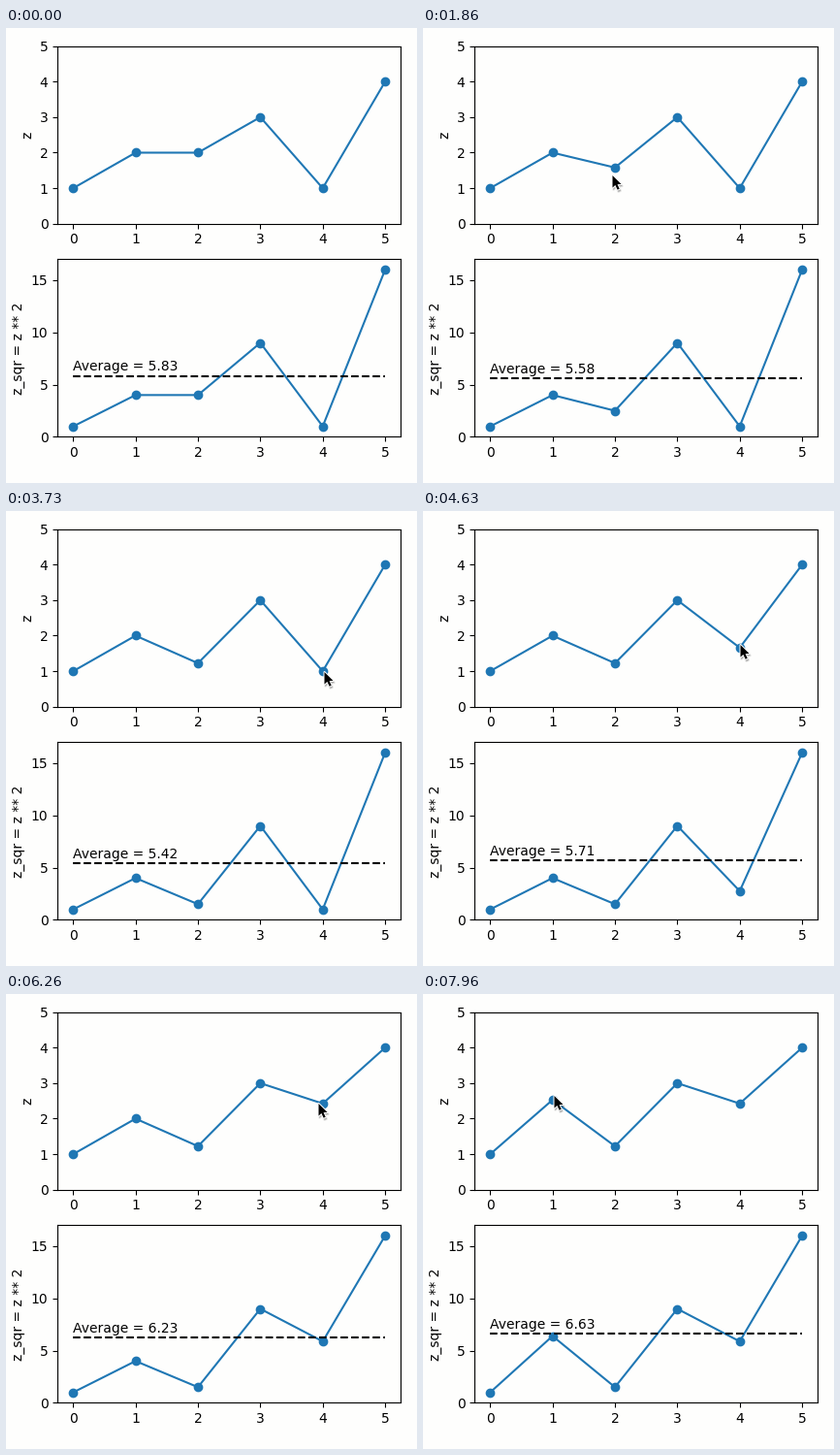
These frames come from a looping animation (424x469 px, 8000 ms). A matplotlib script:

```python
import numpy as np
import matplotlib.pyplot as plt
from matplotlib.animation import FuncAnimation
from matplotlib.patches import Polygon
from matplotlib.transforms import IdentityTransform

W, H, DPI = 424, 469, 100
LOOP, STEP = 8000, 32
BACK, BLUE = "#fefefd", "#1f77b4"

# Pointer moves: start ms, end ms, end position, downward bow of the path
ENTRY = (385, 120)
MOVES = [
    (220, 1040, (198, 131), 14),
    (1430, 2060, (194, 157), 0),
    (2840, 3100, (341, 158), 0),
    (3250, 3560, (328, 165), 0),
    (4180, 4930, (326, 119), 0),
    (5030, 5190, (322, 112), 0),
    (6250, 7030, (134, 129), 14),
    (7490, 8060, (135, 100), 0),
]
# Dragged points: start ms, end ms, index, end value
DRAGS = [
    (1600, 2085, 2, 1.225),
    (4240, 4930, 4, 2.2),
    (5030, 5200, 4, 2.425),
    (7500, 8060, 1, 2.605),
]
Z0 = np.array([1, 2, 2, 3, 1, 4], float)
X = np.arange(6)
ARROW = 0.9 * np.array([(0, 0), (0, 14), (3.2, 11), (5.7, 16.3), (8, 15.3),
                        (5.6, 10.2), (10, 9.9)])


def ease(t, start, end):
    u = np.clip((t - start) / (end - start), 0, 1)
    return u * u * (3 - 2 * u)


def pointer(t):
    pos = np.array(ENTRY, float)
    for start, end, goal, bow in MOVES:
        s = ease(t, start, end)
        pos += (goal - pos) * s
        pos[1] += bow * np.sin(np.pi * s)
        if t < end:
            break
    return np.round(pos)


def heights(t):
    z = Z0.copy()
    for start, end, k, goal in DRAGS:
        z[k] += (goal - z[k]) * ease(t, start, end)
    return z


def add_axes(top, bottom, ymax, ystep, ylabel):
    left, right = 53.2, 407.2
    ax = fig.add_axes([left / W, 1 - bottom / H,
                       (right - left) / W, (bottom - top) / H])
    ax.set(xlim=(-0.25, 5.25), ylim=(0, ymax), xticks=X, ylabel=ylabel,
           yticks=range(0, ymax + 1, ystep), facecolor=BACK)
    return ax


def add_arrow(dx, dy, width, color, alpha=1):
    shape = Polygon(ARROW, closed=True, fc=color, ec=color, alpha=alpha,
                    lw=width * 72 / DPI, joinstyle="round", zorder=5,
                    transform=IdentityTransform())
    fig.add_artist(shape)
    return shape, (dx, dy)


plt.rcParams["font.family"] = "DejaVu Sans"
fig = plt.figure(figsize=(W / DPI, H / DPI), dpi=DPI, facecolor=BACK)
ax_z = add_axes(18.7, 201.7, 5, 1, "z")
ax_sqr = add_axes(238.4, 421.4, 17, 5, "z_sqr = z ** 2")
line_z, = ax_z.plot(X, Z0, "o-", color=BLUE)
line_sqr, = ax_sqr.plot(X, Z0 ** 2, "o-", color=BLUE)
line_avg, = ax_sqr.plot([0, 5], [0, 0], "--", color="black")
label = ax_sqr.text(0, 0, "")

# Soft shadow, white rim, black body
arrows = [add_arrow(1.5, 3, 2.5, "black", 0.09),
          add_arrow(1.5, 3, 1, "black", 0.12),
          add_arrow(0.5, 1, 2, "white"),
          add_arrow(0.5, 1, 0, "black")]


def update(i):
    t = i * STEP
    z = heights(t)
    avg = (z ** 2).mean()
    line_z.set_ydata(z)
    line_sqr.set_ydata(z ** 2)
    line_avg.set_ydata([avg, avg])
    label.set_y(avg + 0.5)
    label.set_text(f"Average = {avg:.2f}")

    tip = pointer(t)
    for shape, offset in arrows:
        x, y = (ARROW + tip + offset).T
        shape.set_xy(np.column_stack([x, H - y]))
        shape.set_visible(t > MOVES[0][0])


anim = FuncAnimation(fig, update, frames=LOOP // STEP, interval=STEP,
                     init_func=lambda: update(0), repeat=True, repeat_delay=0)
plt.show()
```
